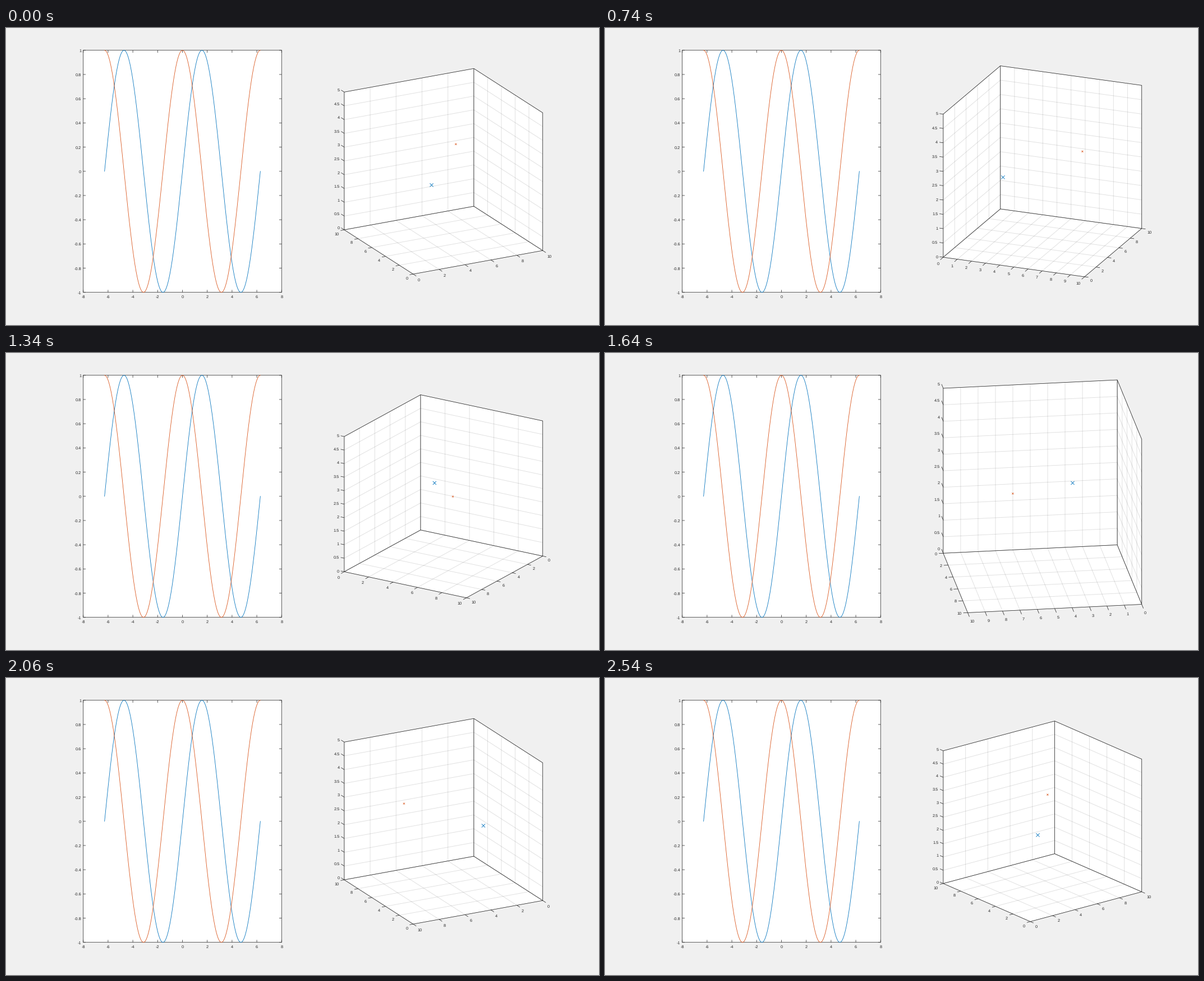
A matplotlib script that plays this animation: 1057x530 px, repeating every 2600 ms.

```python
import numpy as np
import matplotlib.pyplot as plt
from matplotlib.animation import FuncAnimation
from matplotlib.collections import LineCollection, PolyCollection

W, H, DPI = 1057, 530, 128
PX = 72 / DPI
STEP_MS = 20
HOLD_MS, TURN_MS, LOOP_MS = 500, 60, 2600
INK = (0.15, 0.15, 0.15)
BLUE = (0, 0.447, 0.741)
ORANGE = (0.85, 0.325, 0.098)
FONT = 7.34 * PX
LINE = 0.75 * PX

# Plot boxes in pixels, measured from the top left corner
TOP, BOTTOM = 0.075 * H, 0.89 * H
L0, L1 = 0.13 * W + 0.3, 0.4647 * W + 0.1
R0, R1 = 0.5703 * W + 0.1, 0.905 * W + 0.1
ELEV = np.radians(20)

plt.rcParams["path.snap"] = False
plt.rcParams["text.hinting"] = "none"
plt.rcParams["font.family"] = "Liberation Sans"

fig = plt.figure(figsize=(W / DPI, H / DPI), dpi=DPI, facecolor="#f0f0f0")
ax = fig.add_axes([0, 0, 1, 1])
ax.set_xlim(0, W)
ax.set_ylim(H, 0)
ax.axis("off")


def label(x, y, value, ha):
    """Number whose digits are centred vertically on y."""
    text = f"{round(value, 1) + 0.0:g}"
    return ax.text(x, y + 2.65, text, ha=ha, va="baseline",
                   size=FONT, color=INK, zorder=5)


def lines(color, zorder, segments=(), alpha=1, width=LINE):
    group = LineCollection(list(segments), colors=[color], linewidths=width,
                           alpha=alpha, zorder=zorder)
    return ax.add_collection(group, autolim=False)


def draw_waves():
    def to_px(x, y):
        return (L0 + (x + 8) / 16 * (L1 - L0),
                BOTTOM - (y + 1) / 2 * (BOTTOM - TOP))

    ax.fill([L0, L1, L1, L0], [TOP, TOP, BOTTOM, BOTTOM], color="white", lw=0)
    corners = [(L0, TOP), (L1, TOP), (L1, BOTTOM), (L0, BOTTOM), (L0, TOP)]
    segments = [corners]
    tick = 0.01 * (BOTTOM - TOP)
    for v in range(-8, 9, 2):
        x, _ = to_px(v, 0)
        segments += [[(x, BOTTOM), (x, BOTTOM - tick)], [(x, TOP), (x, TOP + tick)]]
        label(x, BOTTOM + 8, v, "center")
    for v in np.linspace(-1, 1, 11):
        _, y = to_px(0, v)
        segments += [[(L0, y), (L0 + tick, y)], [(L1, y), (L1 - tick, y)]]
        label(L0 - 3.4, y + 0.4, v, "right")
    lines(INK, 3, segments)
    t = np.linspace(-2 * np.pi, 2 * np.pi, 400)
    for wave, color in ((np.sin, BLUE), (np.cos, ORANGE)):
        ax.plot(*to_px(t, wave(t)), color=color, lw=LINE * 1.1, zorder=4)


class Camera:
    """Orthographic view of the 10 x 10 x 5 box, fitted to the right area."""

    def __init__(self, azimuth):
        a = np.radians(azimuth)
        self.cos, self.sin = np.cos(a), np.sin(a)
        wide = abs(self.cos) + abs(self.sin)
        tall = np.cos(ELEV) + np.sin(ELEV) * wide
        self.scale = min((R1 - R0) / wide, (BOTTOM - TOP) / tall)
        self.back = (0 if self.sin > 0 else 10, 10 if self.cos > 0 else 0)
        self.front = (10 - self.back[0], 10 - self.back[1])

    def __call__(self, x, y, z):
        u, v, w = x / 10 - 0.5, y / 10 - 0.5, z / 5 - 0.5
        right = u * self.cos + v * self.sin
        up = (v * self.cos - u * self.sin) * np.sin(ELEV) + w * np.cos(ELEV)
        return np.array([(R0 + R1) / 2 + self.scale * right,
                         (TOP + BOTTOM) / 2 - self.scale * up])


def direction(start, end):
    d = end - start
    return d / np.hypot(*d)


def tick_values(start, end):
    roomy = np.hypot(*(end - start)) > 245
    return range(0, 11, 1 if roomy else 2)


def cross(center, r):
    x, y = center
    return [[(x - r, y - r), (x + r, y + r)], [(x - r, y + r), (x + r, y - r)]]


def floor_label(end, d, value):
    side = "center" if abs(d[0]) < 0.25 else "left" if d[0] > 0 else "right"
    x, y = end + 3 * d
    drop = 5 if d[1] > 0.06 else 0
    return label(x, y + drop, value, side)


draw_waves()
faces = PolyCollection([], facecolors="white", linewidths=0, zorder=1)
ax.add_collection(faces, autolim=False)
grid = lines(INK, 2, alpha=0.15, width=0.9 * PX)
frame = lines(INK, 3)
big_mark = lines(BLUE, 4, width=0.85 * PX)
small_mark = lines(ORANGE, 4, width=0.75 * PX)
labels = []


def draw_box(azimuth):
    cam = Camera(azimuth)
    (bx, by), (fx, fy) = cam.back, cam.front
    while labels:
        labels.pop().remove()

    floor = [cam(fx, fy, 0), cam(fx, by, 0), cam(bx, by, 0), cam(bx, fy, 0)]
    wall_x = [cam(bx, by, 0), cam(bx, fy, 0), cam(bx, fy, 5), cam(bx, by, 5)]
    wall_y = [cam(bx, by, 0), cam(fx, by, 0), cam(fx, by, 5), cam(bx, by, 5)]
    faces.set_verts([floor, wall_x, wall_y])

    near, far_y, _, far_x = floor
    xs, ys = tick_values(near, far_x), tick_values(near, far_y)
    zs = np.linspace(0, 5, 11)
    grid.set_segments(
        [[cam(x, fy, 0), cam(x, by, 0), cam(x, by, 5)] for x in xs]
        + [[cam(fx, y, 0), cam(bx, y, 0), cam(bx, y, 5)] for y in ys]
        + [[cam(fx, by, z), cam(bx, by, z), cam(bx, fy, z)] for z in zs])

    edges = [floor + floor[:1], wall_x[1:], wall_y[1:3] + wall_y[3:],
             [cam(bx, by, 0), cam(bx, by, 5)]]
    size = 0.025 * cam.scale

    def add_tick(base, d):
        end = base + size * d
        edges.append([base, end])
        return end

    d = direction(far_y, near)
    for x in xs:
        labels.append(floor_label(add_tick(cam(x, fy, 0), d), d, x))
    d = direction(far_x, near)
    for y in ys:
        labels.append(floor_label(add_tick(cam(fx, y, 0), d), d, y))

    # The height scale stands on whichever side corner is further left
    if far_x[0] < far_y[0]:
        corner, left = (bx, fy), far_x
    else:
        corner, left = (fx, by), far_y
    d = direction(near, left)
    for z in zs:
        x, y = add_tick(cam(*corner, z), d)
        labels.append(label(x - 2.8, y + 0.6 * d[1], z, "right"))
    frame.set_segments(edges)

    big_mark.set_segments(cross(cam(3, 3, 2.5) + 0.4, 3.1))
    small_mark.set_segments(cross(cam(7, 7, 3) + 0.4, 1.5))


def update(i):
    t = i * STEP_MS
    turn = 0 if t < HOLD_MS else 1 + (t - HOLD_MS) // TURN_MS
    draw_box(-28 + 10 * turn)
    return []


anim = FuncAnimation(fig, update, frames=LOOP_MS // STEP_MS, interval=STEP_MS,
                     init_func=lambda: update(0), repeat=True, repeat_delay=0,
                     blit=False)
plt.show()
```
